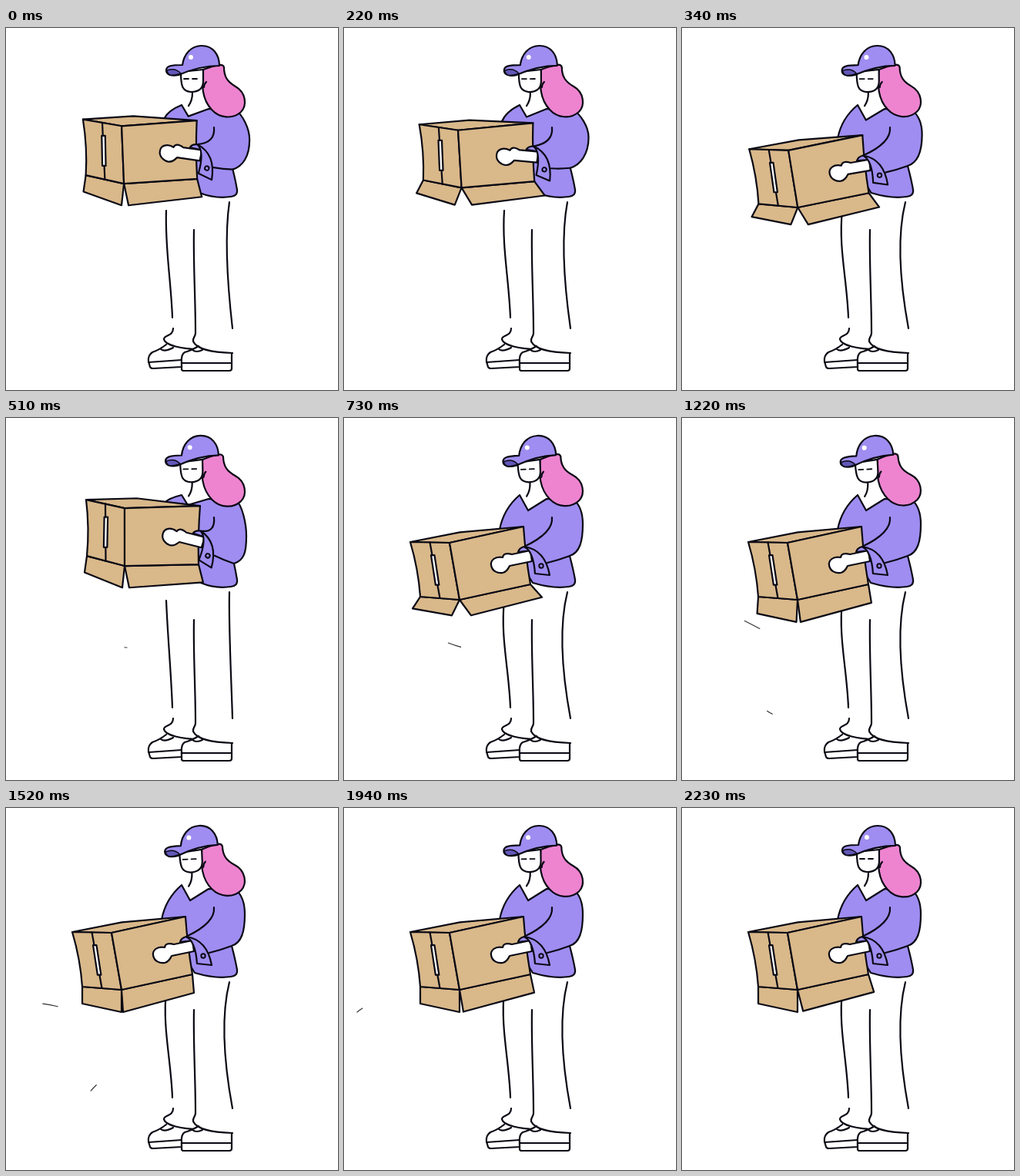
Write an HTML page with a canvas that moves like this. It is 431 px wide and 470 px high and loops after 2.33 s.

```html
<!DOCTYPE html>
<html>
<head>
<meta charset="utf-8">
<style>
html, body { margin: 0; width: 100%; height: 100%; overflow: hidden; background: #fff; }
canvas { display: block; }
</style>
</head>
<body>
<canvas id="stage" width="431" height="470"></canvas>
<script>
const ctx = document.getElementById('stage').getContext('2d');
const INK = '#090914', PURPLE = '#9f8df1', PINK = '#ee84d0', TAN = '#d9b88a';
const LOOP = 2330, HOLD = LOOP / 23;        // each picture is held for one step
const PEAK = 90, BOUNCE = 410, REST = 705;  // the box is tossed, then rests from REST on

const clamp = u => Math.min(1, Math.max(0, u));
const ease = u => (u = clamp(u), u * u * (3 - 2 * u));
const mix = (a, b, u) => [a[0] + (b[0] - a[0]) * u, a[1] + (b[1] - a[1]) * u];
const shift = (p, x, y) => [p[0] + x, p[1] + y];

function draw(d, fill, width = 2.2, ink = INK) {
  const path = new Path2D(d);
  if (fill) { ctx.fillStyle = fill; ctx.fill(path); }
  if (width) { ctx.lineWidth = width; ctx.strokeStyle = ink; ctx.stroke(path); }
}
function disc(x, y, r, fill, outlined) {
  ctx.beginPath();
  ctx.arc(x, y, r, 0, 7);
  ctx.fillStyle = fill;
  ctx.fill();
  if (outlined) { ctx.lineWidth = 2; ctx.strokeStyle = INK; ctx.stroke(); }
}
function turned([x, y], angle, paint) {
  ctx.save();
  ctx.translate(x, y);
  ctx.rotate(angle);
  paint();
  ctx.restore();
}

function legs(stretch) {
  const left = 203 + 7 * stretch, right = 279 + 10 * stretch;
  draw(`M208 237C${left} 285 214 325 216 376`);
  draw('M244 262C243 305 246 350 246 396');
  draw(`M290 226C${right} 270 ${right + 3} 325 294 390`);
  draw('M208 411Q199 418 190 421Q184 425 185 433L187 440Q188 442 191 442L228 440V429L240 417', '#fff');
  draw('M185 434L228 431M201 417Q206 421 217 415');
  draw('M217 390C217 401 205 398 205 404C206 412 229 417 251 417');
  draw('M250 413Q240 419 232 421Q227 424 228 434V443Q228 445 231 445H290Q293 445 293 442V422', '#fff');
  draw('M228 435H293M242 418Q247 422 255 418');
  draw('M246 396C246 401 242 402 243 407C248 417 265 421 294 422');
}

function carton([a, d, c, e, f, g], flareLeft, flareRight) {
  const flap = (p, reach, length, flare) => shift(p, reach, length * (1 - .3 * flare * flare));
  const left = -10 * flareLeft, right = 2 + 13 * flareRight;
  draw(`M${e}L${f} ${flap(f, left, 29, flareLeft)} ${flap(e, left, 22, flareLeft)}Z`, TAN);
  draw(`M${f}L${g} ${flap(g, right, 24, flareRight)} ${flap(f, right, 29, flareRight)}Z`, TAN);
  const back = shift(a, (c[0] - d[0]) * .67, (c[1] - d[1]) * .6);
  draw(`M${a}L${back} ${c} ${d}Z`, TAN);
  draw(`M${a}Q${shift(mix(a, e, .5), 4, 0)} ${e}L${f} ${d}Z`, TAN);
  draw(`M${d}L${c}Q${shift(mix(c, g, .5), -2, 0)} ${g}L${f}Z`, TAN);
  const top = mix(a, d, .5), end = mix(e, f, .5), p = mix(top, end, .23), q = mix(top, end, .76);
  draw(`M${top}L${end}`);
  draw(`M${shift(p, -1.5, 0)}L${shift(p, 3, 0)} ${shift(q, 2, 0)} ${shift(q, -2.5, 0)}Z`, '#fff');
}

function torso(tip, vee, back, under, hem) {
  draw(`M${tip}Q${tip[0] + 5} ${100 + (tip[1] - 100) * .4} 228 100L${vee} 263 105 298 106
    C307 113 ${shift(back, 0, -15)} ${back}
    C${shift(back, 0, 22)} ${shift(under, 13, -4)} ${under}
    Q298 198 300 210Q301 218 292 219Q272 222 ${hem}Z`, PURPLE);
}

function arm(wrist, angle, under) {
  const place = (x, y) => shift(wrist, x * Math.cos(angle) - y * Math.sin(angle),
    x * Math.sin(angle) + y * Math.cos(angle));
  const top = place(-8, -12), elbow = place(22, 9);
  draw(`M270 129Q272 149 ${top}L${wrist} ${elbow} ${under}Z`, PURPLE, 0);
  turned(wrist, angle, () => {
    draw('M-16 -5Q-15 -10 -8 -12L0 -7Z', PURPLE);
    draw(`M0 -7L-24 -2Q-35 -5 -36 2C-46 0 -52 6 -51 12
      C-50 20 -42 23 -36 22C-31 21 -29 17 -27 13L2 7Z`, '#fff');
    draw('M-8 -12Q19 -8 25 25L6 23Q4 -6 -8 -12Z', PURPLE);
    disc(14, 13, 2.7, PURPLE, true);
  });
  draw(`M270 129Q272 149 ${top}M${under}Q${shift(mix(under, elbow, .5), 0, 1)} ${elbow}`);
}

// Drawn around the base of the neck
function head() {
  ctx.translate(-252, -98);
  draw(`M256 54Q266 50 276 48Q282 47 283 51C283 64 288 70 298 76
    C312 84 313 101 305 109C294 119 277 117 267 106C254 92 254 74 256 54Z`, PINK);
  draw('M227 57C227 76 229 82 240 83C251 83 256 78 256 69V54Z', '#fff');
  draw('M242 84Q242 94 237 101M257 77Q257 73 260 70');
  draw('M231 66H237M242 66H248', null, 1.8);
  draw(`M208 55C208 49 215 48 229 48C231 34 240 23 254 23C269 23 277 35 277 49
    C258 49 240 54 224 61C214 63 208 60 208 55Z`, PURPLE);
  draw('M209 55Q220 51 227 59Q218 62 213 61Q209 59 209 55Z', '#6257b8', 1.5);
  disc(240, 38, 3, '#fff');
}

// A short stroke running along a cubic curve
function streak([a, b, c, d], u) {
  const point = v => {
    const m = mix(b, c, v);
    return mix(mix(mix(a, b, v), m, v), mix(m, mix(c, d, v), v), v);
  };
  const from = clamp(u - .13), to = clamp(u);
  if (from < to) draw(`M${point(from)}Q${point((from + to) / 2)} ${point(to)}`, null, 1.2, '#333');
}

function render(t) {
  const phase = (t - PEAK) / BOUNCE, resting = t > REST;
  const lift = resting ? 0 : Math.abs(Math.cos(Math.PI * phase));
  const stretch = lift ** 3;
  const flare = resting ? 1 - ease((t - 950) / 350) : .6 + .4 * Math.cos(2 * Math.PI * (phase - .4));
  const drift = .4 * clamp((t - 1520) / 700);
  const at = (x0, y0, x1, y1) => mix([x0, y0], [x1, y1], lift);

  ctx.fillStyle = '#fff';
  ctx.fillRect(0, 0, 431, 470);
  ctx.lineCap = ctx.lineJoin = 'round';

  const box = [at(86, 161, 104, 106), at(137, 162, 154, 117), at(233, 141, 252, 114),
    at(99, 232, 105, 179), at(150, 236, 154, 192), at(242, 216, 250, 190)];
  const back = [310 + 2 * lift + 7 * Math.sin(Math.PI * lift), 138 + 15 * stretch];
  const under = [293 + 3 * stretch, 179 + 10 * stretch];
  legs(stretch);
  torso(at(202, 145, 206, 110), at(239, 120, 236, 113), back, under, [box[5][0] + 3, 214]);
  carton(box, flare, flare + drift);
  arm(at(242, 179, 255, 161), .45 * lift, under);
  turned([252, 98], -.0275 * (1 - Math.cos(2 * Math.PI * t / LOOP)), head);
  streak([[157, 298], [120, 297], [60, 228], [17, 265]], (t - 470) / 1350);
  streak([[152, 390], [112, 388], [92, 378], [122, 356]], (t - 870) / 690);
}

const start = performance.now();
function tick() {
  const t = (performance.now() - start) % LOOP;
  render(Math.floor(t / HOLD) * HOLD);
  requestAnimationFrame(tick);
}
tick();
</script>
</body>
</html>
```
